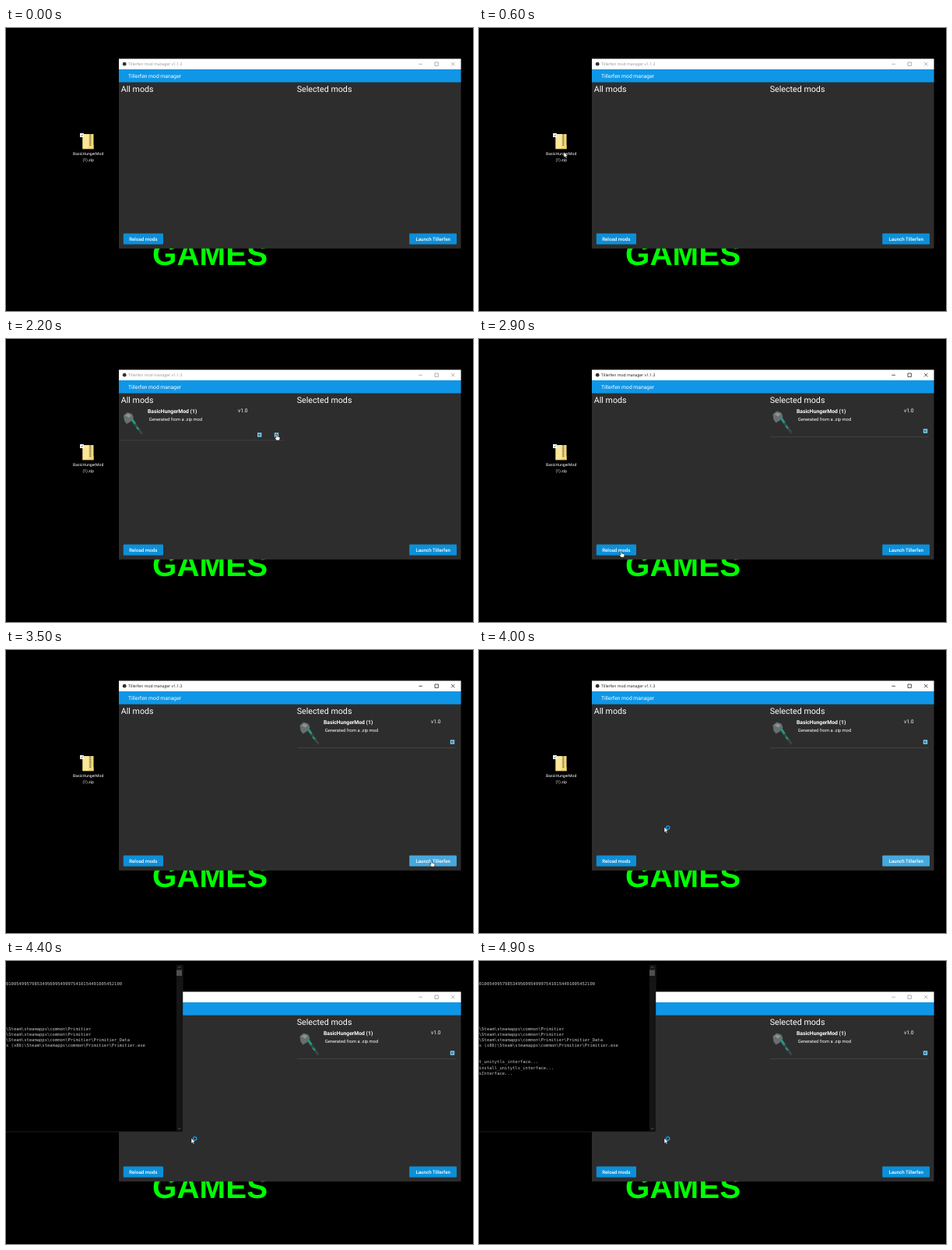
Write an HTML page that moves like this. It is 600 px wide and 363 px high and loops after 8 s.

```html
<!DOCTYPE html>
<html lang="en">
<head>
<meta charset="utf-8">
<title>Mod manager</title>
<style>
  html, body { margin: 0; width: 100%; height: 100%; overflow: hidden; background: #000; }
  svg { display: block; width: 100vw; height: 100vh; }
  text { fill: #fff; font-family: Roboto, sans-serif; text-rendering: geometricPrecision; white-space: pre; }
  .ui { font-family: "Open Sans", sans-serif; font-size: 5.1px; }
  .head { font-size: 10.7px; }
  .btn { font-size: 6.2px; font-weight: 500; text-anchor: middle; }
  .name { font-size: 6.8px; font-weight: 700; }
  .small { font-size: 5.8px; }
  .ver { font-size: 6.7px; }
  .mono { font-family: "DejaVu Sans Mono", monospace; font-size: 5.5px; fill: #c4c4c4; }
  .games { font: bold 40.4px "Liberation Sans", Arial, sans-serif; fill: #0f0; }
</style>
</head>
<body>
<svg viewBox="0 0 600 363" preserveAspectRatio="none">
  <defs>
    <g id="hammer">
      <path d="M9 10L13 9L26 28L24 30Z" fill="#3b4645"/>
      <path d="M10 10l3-1 4 6-2 2zM18 19l3 3-1 2-3-3z" fill="#1b9a83"/>
      <path d="M1 5L6 1L12 3L14 8L10 13L5 16L2 12Z" fill="#65706f"/>
      <path d="M3 5l4-2 4 2-3 3z" fill="#8c9694"/>
    </g>
    <g id="details">
      <text class="name" x="0" y="95">BasicHungerMod (1)</text>
      <text class="small" x="1.7" y="105">Generated from a .zip mod</text>
    </g>
    <g id="left">
      <rect width="5.4" height="5.4" fill="#7fd0f5"/>
      <path d="M4.4 2.7H1.4M2.7 1.3L1.3 2.7L2.7 4.1" fill="none" stroke="#12435c" stroke-width=".9"/>
    </g>
  </defs>

  <rect width="600" height="363"/>
  <text class="games" x="188" y="303.5">GAMES</text>

  <!-- desktop file -->
  <path d="M98.5 136h14v19h-14z" fill="#f3d978"/>
  <path d="M98.5 136h7.5v19h-7.5z" fill="#fae79a"/>
  <path d="M108.3 136v15" stroke="#77704f" stroke-width="2" stroke-dasharray="1.2 .8"/>
  <path d="M112.5 150v5h-14" fill="none" stroke="#d5b64e" stroke-width=".7"/>
  <rect x="95" y="135" width="5" height="5" fill="#fff"/>
  <path d="M96 137.5l1.2 1.2 2-2.4" fill="none" stroke="#333" stroke-width=".7"/>
  <g class="ui" text-anchor="middle">
    <text x="105.7" y="163">BasicHungerMod</text>
    <text x="105.7" y="171">(1).zip</text>
  </g>

  <!-- manager window -->
  <rect x="145" y="39.5" width="439.5" height="243.3" fill="#2d2d2d"/>
  <rect x="145" y="39.5" width="439.5" height="13.5" fill="#fff"/>
  <rect x="145" y="53" width="439.5" height="16.6" fill="#0f96e6"/>
  <circle cx="152.2" cy="46.2" r="2.4" fill="#333"/>
  <g id="bar">
    <text class="ui" x="157" y="48.2" style="fill:#111">Tillerfen mod manager v1.1.3</text>
    <path d="M530.3 46.3h4.6M551 44h4.4v4.4h-4.4zM572 44l4.4 4.4M576.4 44l-4.4 4.4" fill="none" stroke="#111" stroke-width=".7"/>
  </g>
  <text x="157" y="63.7" font-size="6.75">Tillerfen mod manager</text>
  <text class="head" x="147.7" y="82">All mods</text>
  <text class="head" x="373.7" y="82">Selected mods</text>

  <g id="avail">
    <use href="#hammer" x="150" y="93"/>
    <use href="#details" x="182"/>
    <text class="ver" x="298" y="93.7">v1.0</text>
    <use href="#left" x="323" y="120.2"/>
    <use href="#left" transform="translate(350.2 120.2) scale(-1 1)"/>
    <path d="M146 130h211" stroke="#484848" stroke-width=".7"/>
  </g>
  <g id="chosen">
    <use href="#hammer" x="376.5" y="91.5"/>
    <use href="#details" x="408"/>
    <text class="ver" x="546" y="93.7">v1.0</text>
    <use href="#left" x="570.8" y="115.3"/>
    <path d="M374 125.5h204" stroke="#484848" stroke-width=".7"/>
  </g>

  <rect id="reload" x="150.8" y="263.5" width="51.2" height="14" rx="1" fill="#0d8fd8"/>
  <text class="btn" x="176.3" y="272.7">Reload mods</text>
  <rect id="launch" x="518.2" y="263.5" width="60.8" height="14" rx="1" fill="#0d8fd8"/>
  <text class="btn" x="548.7" y="272.7">Launch Tillerfen</text>

  <g id="console">
    <path d="M0 0H227V219H0Z"/>
    <path d="M219 5h7.5v213H219z" fill="#151515"/>
    <path d="M219 11.5h7v7.5h-7z" fill="#4f4f4f"/>
    <path d="M221.2 9l1.5-1.5 1.5 1.5M221.2 214.2l1.5 1.5 1.5-1.5" fill="none" stroke="#777" stroke-width=".7"/>
    <path d="M227 5V219H0" fill="none" stroke="#303030" stroke-width=".6"/>
    <g id="log"></g>
  </g>

  <g id="pointer">
    <path id="arrow" d="M0 0V7.2L1.7 5.7L2.9 8.3L4.1 7.7L2.9 5.2H5.1Z" fill="#fff" stroke="#000" stroke-width=".5"/>
    <path id="hand" d="M0 .5Q.7-.4 1.4 .5V3L4.4 3.7Q5.2 4 5 5L4.3 8H.5L-1.9 4.9Q-1.8 4 -.9 4.4L0 5.2Z" fill="#fff" stroke="#000" stroke-width=".5"/>
    <circle id="busy" cx="4.7" cy=".8" r="2.2" fill="none" stroke="#1a9be0" stroke-width="1.3"/>
  </g>
</svg>
<script>
const $ = id => document.getElementById(id);
const show = (id, on) => $(id).style.display = on ? "" : "none";

// start time, baseline, text
const common = "\\Steam\\steamapps\\common\\Primitier";
const log = [
  [0, 31.3, "010054995798534956995499975410154491005452100"],
  [0, 88.6, common],
  [0, 95.6, common],
  [0, 102.6, common + "\\Primitier_Data"],
  [0, 109.6, "s (x86)" + common + "\\Primitier.exe"],
  [4600, 131.4, "t_unitytls_interface..."],
  [4700, 138.5, "install_unitytls_interface..."],
  [4800, 145.5, "sInterface..."]
].map(([start, y, words]) => {
  const node = document.createElementNS("http://www.w3.org/2000/svg", "text");
  node.setAttribute("class", "mono");
  node.setAttribute("x", 0);
  node.setAttribute("y", y);
  node.textContent = words;
  $("log").append(node);
  return { start, node };
});

// pointer path: time, x, y
const path = [
  [100, 140, 205], [500, 109, 159], [700, 109, 159], [1100, 265, 175],
  [1200, 265, 175], [1400, 190, 256], [1600, 183, 270], [1800, 183, 270],
  [2200, 347, 122], [2400, 347, 122], [2800, 182, 272], [3000, 182, 272],
  [3500, 546, 270], [3700, 546, 270], [4000, 238, 227], [8000, 238, 227]
];

function pointerAt(t) {
  const i = Math.max(1, path.findIndex(p => p[0] > t));
  const [t0, x0, y0] = path[i - 1], [t1, x1, y1] = path[i];
  const k = Math.max(0, (t - t0) / (t1 - t0)), e = k * k * (3 - 2 * k);
  return [x0 + (x1 - x0) * e, y0 + (y1 - y0) * e];
}

function draw(now) {
  const t = Math.floor(now % 8000 / 100) * 100;
  const [x, y] = pointerAt(t);
  const overButton = y > 263 && y < 278 && (x > 151 && x < 202 || x > 518 && x < 579);
  const overArrow = t < 2400 && Math.hypot(x - 347.5, y - 123) < 4;
  const hand = overButton || overArrow;

  show("pointer", t >= 100);
  $("pointer").setAttribute("transform", `translate(${x} ${y})`);
  show("hand", hand);
  show("arrow", !hand);
  show("busy", t >= 3800);

  $("bar").style.opacity = t >= 2300 && t < 4100 ? 1 : 0.45;
  show("avail", t >= 1300 && t < 2400);
  show("chosen", t >= 2400);
  $("launch").setAttribute("fill", t >= 3500 && t < 4100 ? "#45a8de" : "#0d8fd8");

  show("console", t >= 4100);
  $("console").style.opacity = t < 4200 ? 0.45 : t < 4300 ? 0.89 : 1;
  for (const { start, node } of log) node.style.display = t >= start ? "" : "none";
}

const begin = performance.now();
(function loop() {
  draw(performance.now() - begin);
  requestAnimationFrame(loop);
})();
</script>
</body>
</html>
```
